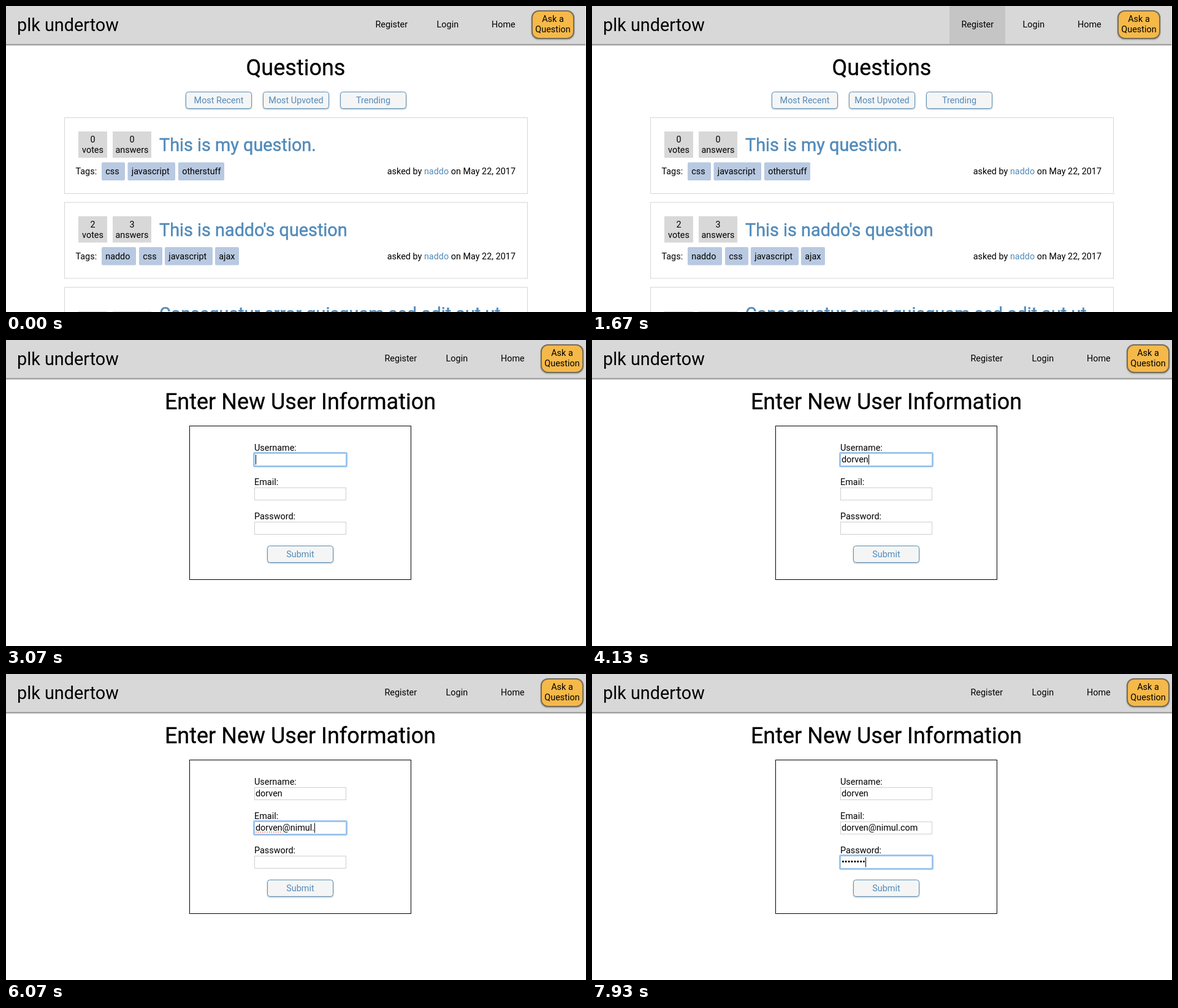
Animation of 946 by 500 pixels, one loop 8 s. Source, as an HTML page:

```html
<!DOCTYPE html>
<html lang="en">
<head>
<meta charset="utf-8">
<title>Question board</title>
<style>
  html, body { margin: 0; width: 100%; height: 100%; overflow: hidden; background: #fff; }
  svg { display: block; width: 946px; height: 500px; font: 14.4px Roboto, sans-serif; }
  text { white-space: pre; }
  .mid { text-anchor: middle; }
  .end { text-anchor: end; }
  .logo { font-size: 28.8px; }
  .heading { font-size: 36px; stroke: #000; stroke-width: .3px; }
  .title { font-size: 28.8px; fill: #528bba; stroke: #528bba; stroke-width: .5px; }
  .blue { fill: #528bba; }
  .header { fill: #d8d8d8; filter: drop-shadow(0 1px 1.2px rgba(0, 0, 0, .75)); }
  .hover { fill: #c5c5c5; }
  .ask { fill: #f5b94a; stroke: #776c58; stroke-width: 2px; filter: drop-shadow(0 1px 1px rgba(0, 0, 0, .3)); }
  .button { fill: #f5f5f5; stroke: #5a90b8; filter: drop-shadow(0 1px 1px rgba(0, 0, 0, .28)); }
  .card { fill: #fff; stroke: #d6d6d6; }
  .count { fill: #d8d8d8; }
  .tag { fill: #b8c9e1; }
  .form { fill: #fff; stroke: #000; }
  .input { fill: #fff; stroke: #cfcfcf; }
  .ring { fill: #fff; stroke: #9cc5ee; stroke-width: 3px; }
  .caret { fill: #000; }
  .spelling { stroke: #e2604f; stroke-width: 1.8px; stroke-linecap: round; stroke-dasharray: 0 3.6; }
  .edge { fill: #f0f0f0; }
</style>
</head>
<body>
<svg id="stage" viewBox="0 0 946 500"></svg>
<script>
const LOOP = 8000;
const PAGE_CHANGE = 1800;
const HOVER_START = 400;
const HOVER_FADE = 200;

const rect = (x, y, w, h, cls, r = 0, extra = '') =>
  `<rect x="${x}" y="${y}" width="${w}" height="${h}" rx="${r}" class="${cls}" ${extra}/>`;
const text = (x, y, content, cls = '') =>
  `<text x="${x}" y="${y}" class="${cls}">${content}</text>`;

const button = (x, y, label) =>
  rect(x + .5, y + .5, 107, 27, 'button', 4) + text(x + 54, y + 19, label, 'blue mid');

const header = (shift, hover = '') =>
  rect(-5, -5, 956, 67.5, 'header') + hover +
  text(18, 41, 'plk undertow', 'logo') +
  text(602.4 + shift, 35, 'Register') +
  text(702.6 + shift, 35, 'Login') +
  text(792 + shift, 35, 'Home') +
  rect(858 + shift, 8, 68, 45, 'ask', 11) +
  text(892 + shift, 26, 'Ask a', 'mid') +
  text(892 + shift, 43, 'Question', 'mid');

const countBox = (x, y, w, n, label) =>
  rect(x, y, w, 43, 'count') +
  text(x + w / 2, y + 18, n, 'mid') +
  text(x + w / 2, y + 35, label, 'mid');

const tag = (y, [x, w, label]) =>
  rect(x, y, w, 29.5, 'tag', 2) + text(x + 6.2, y + 19.5, label);

const card = (y, votes, answers, title, tags) =>
  rect(95.5, y + .5, 755, 124, 'card') +
  countBox(118, y + 23, 47, votes, 'votes') +
  countBox(174, y + 23, 63, answers, 'answers') +
  text(250, y + 55.3, title, 'title') +
  text(113.5, y + 93, 'Tags:') +
  tags.map(t => tag(y + 73.5, t)).join('') +
  text(831, y + 93, 'asked by <tspan class="blue">naddo</tspan> on May 22, 2017', 'end');

const listPage =
  header(0, rect(583, 0, 91, 62, 'hover', 0, 'id="hover"')) +
  text(472.5, 113, 'Questions', 'heading mid') +
  button(293, 140, 'Most Recent') +
  button(419, 140, 'Most Upvoted') +
  button(545, 140, 'Trending') +
  card(182, 0, 0, 'This is my question.',
    [[156, 38, 'css'], [198.5, 77.5, 'javascript'], [281, 75, 'otherstuff']]) +
  card(320.5, 2, 3, 'This is naddo\'s question',
    [[156, 56, 'naddo'], [217, 38, 'css'], [259, 78, 'javascript'], [341, 39, 'ajax']]) +
  rect(95.5, 459.5, 755, 150, 'card') +
  rect(118, 499, 47, 43, 'count') +
  rect(174, 499, 63, 43, 'count') +
  text(250, 512.5, 'Consequatur error quisquam sed odit aut ut', 'title') +
  rect(945, 0, 1, 500, 'edge');

// Key runs: [first key time, interval, number of keys]
const fields = [
  { label: 'Username:', y: 185, value: 'dorven', focus: 2600, runs: [[3340, 130, 6]] },
  { label: 'Email:', y: 241, value: 'dorven@nimul.com', focus: 4330, runs: [[4470, 140, 7], [5440, 110, 9]] },
  { label: 'Password:', y: 297, value: '•'.repeat(8), focus: 6480, runs: [[6600, 140, 8]] },
];
for (const f of fields)
  f.keys = f.runs.flatMap(([start, gap, n]) => Array.from({ length: n }, (_, i) => start + i * gap));

const formPage =
  header(15) +
  text(480, 113, 'Enter New User Information', 'heading mid') +
  rect(299.5, 140.5, 361, 251, 'form') +
  fields.map(f =>
    text(405, f.y - 4, f.label) + rect(405.5, f.y + .5, 149, 20, 'input')).join('') +
  rect(404.5, 0, 151, 22, 'ring', 1.5, 'id="ring"') +
  fields.map((f, i) => text(407, f.y + 15, '', `value value${i}`)).join('') +
  '<path id="spelling" class="spelling" d="M408 258.3H450"/>' +
  rect(407, 0, 1, 16, 'caret', 0, 'id="caret"') +
  button(426, 336, 'Submit');

const $ = id => document.getElementById(id);
$('stage').innerHTML = `<g id="list">${listPage}</g><g id="form">${formPage}</g>`;
const values = [...document.querySelectorAll('.value')];
const show = (el, on) => { el.style.display = on ? '' : 'none'; };

function render(t) {
  const onForm = t >= PAGE_CHANGE;
  show($('list'), !onForm);
  show($('form'), onForm);
  $('hover').style.opacity = Math.min(1, Math.max(0, (t - HOVER_START) / HOVER_FADE));
  if (!onForm) return;

  const active = fields.filter(f => t >= f.focus).length - 1;
  fields.forEach((f, i) => {
    f.typed = f.keys.filter(k => k <= t).length;
    values[i].textContent = f.value.slice(0, f.typed);
  });
  show($('ring'), active >= 0);
  show($('spelling'), active === 1 && fields[1].typed > 6);

  const field = fields[active];
  const lastKey = field && (field.keys[field.typed - 1] || field.focus);
  show($('caret'), field && (t - lastKey) % 1000 < 500);
  if (!field) return;
  const width = field.typed ? values[active].getComputedTextLength() : 0;
  $('ring').setAttribute('y', field.y - .5);
  $('caret').setAttribute('x', Math.round(407 + width));
  $('caret').setAttribute('y', field.y + 2.5);
}

function tick() {
  render(performance.now() % LOOP);
  requestAnimationFrame(tick);
}
tick();
</script>
</body>
</html>
```
